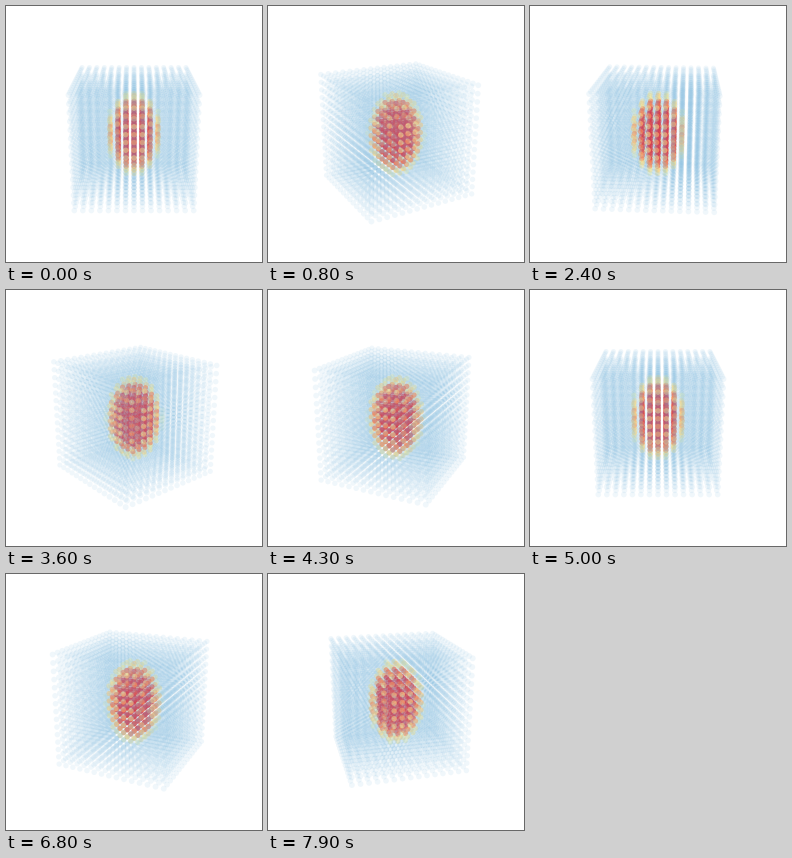
Write a matplotlib script that moves like this. It is 256 by 256 pixels and loops after 8000 ms.

```python
import numpy as np
import matplotlib.pyplot as plt
from matplotlib.animation import FuncAnimation

SIZE, DPI = 256, 128
FRAMES, INTERVAL = 80, 100
STEP = np.radians(3.6)          # turntable step per frame
ELEV = np.radians(20)
DIST = 8.6                      # camera distance, cube half side = 1
FOCAL = SIZE / 2 / np.tan(np.radians(15))
RADIUS = 0.047                  # dot radius in cube units
N = 15

# Regular lattice with an upright ellipsoid in the middle
half = N // 2
k = np.arange(N) - half
i, j, h = (g.ravel() for g in np.meshgrid(k, k, k, indexing="ij"))
q = (i**2 + j**2) / 13 + h**2 / 31
X, Y, Z = i / half, j / half, h / half

# Red core, orange and yellow shell, faint blue outside
STOPS = [0.45, 0.68, 0.82, 0.98, 1.08]
RGBA = np.array([
    (213, 62, 79, 191),
    (252, 141, 89, 184),
    (254, 214, 130, 158),
    (230, 238, 160, 90),
    (120, 183, 222, 28),
]) / 255
COLORS = np.column_stack([np.interp(q, STOPS, c) for c in RGBA.T])


def project(angle):
    """Return screen x, y and pixel scale of every lattice point."""
    ca, sa = np.cos(angle), np.sin(angle)
    ce, se = np.cos(ELEV), np.sin(ELEV)
    side = X * ca + Y * sa
    near = Y * ca - X * sa
    scale = FOCAL / (DIST - ce * near - se * Z)
    up = ce * Z - se * near
    return SIZE / 2 + side * scale, SIZE / 2 - up * scale, scale


fig = plt.figure(figsize=(SIZE / DPI, SIZE / DPI), dpi=DPI, facecolor="white")
ax = fig.add_axes([0, 0, 1, 1])
ax.set_xlim(0, SIZE)
ax.set_ylim(SIZE, 0)
ax.axis("off")
dots = ax.scatter(X, Y, s=np.ones(X.size), c=COLORS, linewidths=0)


def update(frame):
    x, y, scale = project(frame * STEP)
    order = np.argsort(scale, kind="stable")    # far to near
    diameter = 2 * RADIUS * scale[order] * 72 / DPI
    dots.set_offsets(np.column_stack([x, y])[order])
    dots.set_sizes(diameter**2, DPI)
    dots.set_facecolors(COLORS[order])
    return (dots,)


anim = FuncAnimation(fig, update, frames=FRAMES, interval=INTERVAL,
                     repeat=True, repeat_delay=0, blit=False)
plt.show()
```
